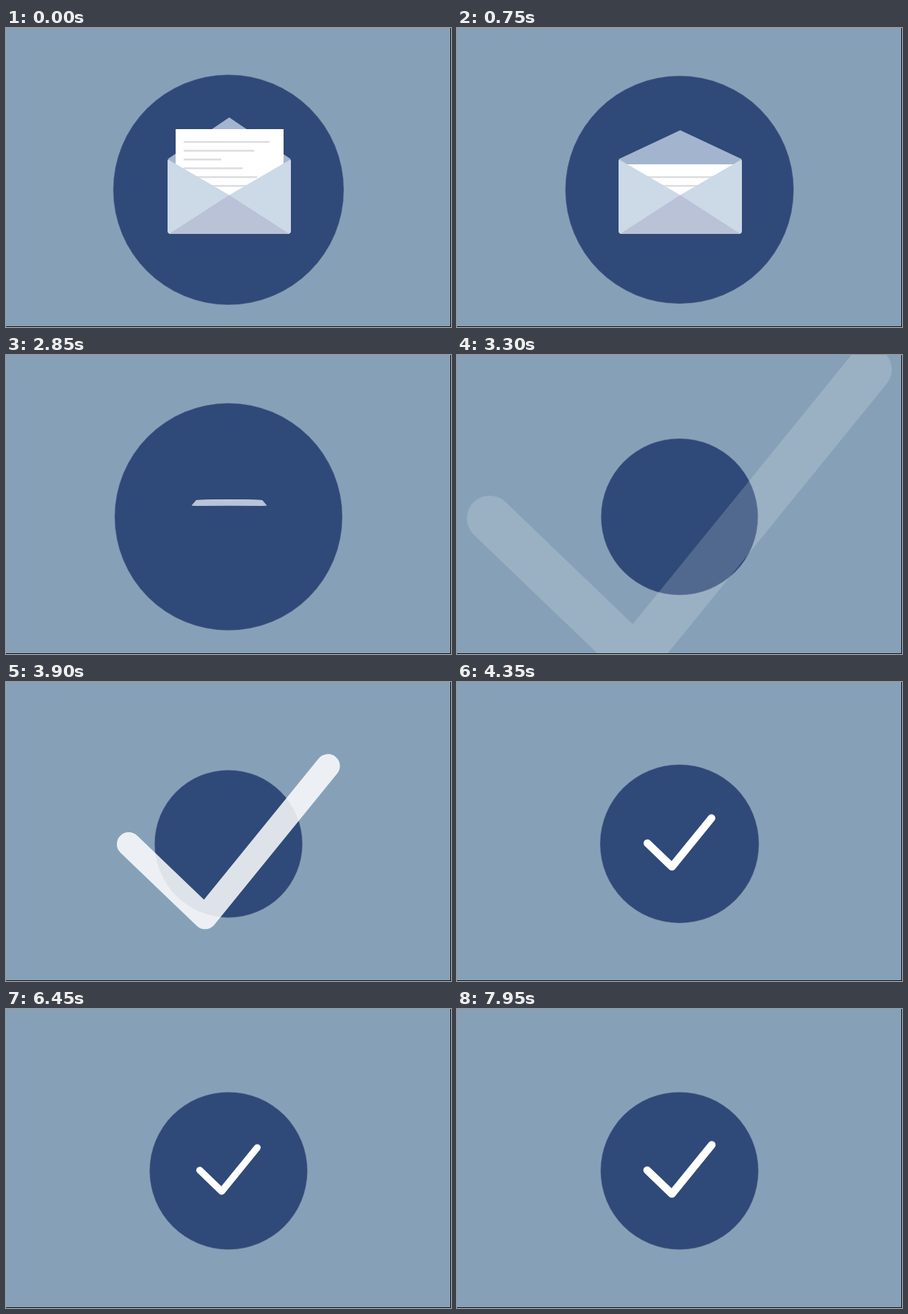
Animation of 606 by 408 pixels, one loop 8000 ms. Source, as an HTML page with a canvas:

```html
<!DOCTYPE html>
<html lang="en">
<head>
<meta charset="utf-8">
<title>Message sent</title>
<style>
  html, body { margin: 0; width: 100%; height: 100%; overflow: hidden; background: #86a1b7; }
  canvas { display: block; width: 606px; height: 408px; }
</style>
</head>
<body>
<canvas id="stage"></canvas>
<script>
const W = 606, H = 408, LOOP = 8000, STEP = 150;
const CX = 304;
const COLLAPSE = 3000, LAND = 4200;
const canvas = document.getElementById('stage');
const ctx = canvas.getContext('2d');
const dpr = window.devicePixelRatio || 1;
canvas.width = W * dpr;
canvas.height = H * dpr;
ctx.scale(dpr, dpr);

const linear = (t, from, to) => Math.min(1, Math.max(0, (t - from) / (to - from)));
const ease = (t, from, to) => {
  const u = linear(t, from, to);
  return u * u * (3 - 2 * u);
};

function polygon(color, ...points) {
  ctx.beginPath();
  points.forEach(([x, y]) => ctx.lineTo(x, y));
  ctx.closePath();
  ctx.fillStyle = color;
  ctx.fill();
}

// Settles, shrinks under the falling check, then springs back when it lands
function radius(t) {
  if (t < LAND) return 155 + 2 * Math.exp(-t / 500) - 54.4 * ease(t, COLLAPSE, COLLAPSE + 380);
  const s = (t - LAND) / 1000;
  return 107.4 - 6.8 * Math.exp(-5 * s) * Math.cos(12 * s);
}

function disc(t) {
  ctx.beginPath();
  ctx.arc(303, 220.8, radius(t), 0, Math.PI * 2);
  ctx.fillStyle = '#2f4a78';
  ctx.fill();
  ctx.strokeStyle = 'rgba(120, 120, 160, .5)';
  ctx.lineWidth = 0.8;
  ctx.stroke();
}

// Drops and sags, bounces up, then tips away into a thin strip
function pose(t) {
  const drop = ease(t, 1200, 1650), rise = ease(t, 1650, 1950), shrink = ease(t, 1950, 3030);
  const squash = drop - rise;
  return {
    top: 178 + 20 * drop - 14 * rise + 15 * shrink,
    height: 103 * (1 - shrink) - 5 * squash,
    halfTop: 84 - 42 * shrink,
    halfBase: 84 - 35.6 * shrink - 1.5 * squash,
    bow: 8 * drop - 12 * rise + 3.5 * shrink,
    tint: shrink
  };
}

function bodyPath(e) {
  const base = e.top + e.height;
  const a = CX - e.halfTop, b = CX + e.halfTop, c = CX + e.halfBase, d = CX - e.halfBase;
  const r = e.height / 23;
  const path = new Path2D();
  path.moveTo(a + r, e.top);
  path.quadraticCurveTo(CX, e.top + 2 * e.bow, b - r, e.top);
  path.quadraticCurveTo(b, e.top, b, e.top + r);
  path.lineTo(c, base - r);
  path.quadraticCurveTo(c, base, c - r, base);
  path.quadraticCurveTo(CX, base + e.bow, d + r, base);
  path.quadraticCurveTo(d, base, d, base - r);
  path.lineTo(a, e.top + r);
  path.quadraticCurveTo(a, e.top, a + r, e.top);
  return path;
}

function letter(top, base) {
  ctx.fillStyle = '#fff';
  ctx.fillRect(231, top, 147, base - 3 - top);
  ctx.fillStyle = '#d9dadd';
  [117, 96, 51, 80, 100, 100].forEach((width, i) => {
    const y = top + 16.3 + 12 * i;
    if (y < base - 5) ctx.fillRect(242, y, width, 2.3);
  });
}

function envelope(t) {
  if (t >= COLLAPSE) return;
  const e = pose(t);
  const fold = 2 * ease(t, 600, 1200) - 1;
  const k = e.height / 103;
  const base = e.top + e.height;
  const mid = e.top + e.bow;
  const reach = Math.abs(e.bow) * 2 + 2;
  const low = base + reach, high = e.top - reach;
  const tip = [CX, mid + fold * (fold < 0 ? 56 : 63) * k];
  const seam = [CX, mid + 50 * k];
  const left = [CX - e.halfTop, e.top + 1], right = [CX + e.halfTop, e.top + 1];
  const body = bodyPath(e);

  ctx.fillStyle = '#a3b5ce';
  ctx.fill(body);
  if (fold < 0) polygon('#a3b5ce', left, tip, right);
  if (fold < 1) letter(138 + 48 * ease(t, 0, 750), base);

  ctx.save();
  ctx.clip(body);
  polygon('#ccd9e6', left, seam, right, [right[0] + 2, low], [left[0] - 2, low]);
  polygon('#b9c2d7', [CX - e.halfBase + 2, base], seam, [CX + e.halfBase - 2, base],
    [CX + e.halfBase, low], [CX - e.halfBase, low]);
  if (fold > 0) {
    const flap = (color, dy) => polygon(color, [left[0], high], [left[0], left[1] + dy],
      [CX, tip[1] + dy], [right[0], right[1] + dy], [right[0], high]);
    flap('#b3c5d8', 1.8 * k);
    flap('#dee6ee', -k);
  }
  ctx.restore();

  ctx.globalAlpha = e.tint;
  ctx.fillStyle = '#b8c3da';
  ctx.fill(body);
  ctx.globalAlpha = 1;
}

// Falls towards the disc at a steady rate, then keeps pulsing
function checkScale(t) {
  const fall = 3.1 + (3900 - t) / 214;
  const pulse = 0.927 - 0.077 * Math.cos((t - 5100) / 1140 * Math.PI * 2);
  return Math.max(fall, pulse);
}

function check(t) {
  const s = checkScale(t);
  ctx.save();
  ctx.translate(303, 219.4);
  ctx.scale(s, s);
  ctx.globalAlpha = linear(t, 3150, 4040);
  ctx.beginPath();
  ctx.moveTo(-43.8, 0.6);
  ctx.lineTo(-10.3, 32.8);
  ctx.lineTo(43.7, -33.8);
  ctx.lineCap = ctx.lineJoin = 'round';
  ctx.lineWidth = 10.5;
  ctx.strokeStyle = '#fff';
  ctx.stroke();
  ctx.restore();
}

function draw(now) {
  const t = Math.floor((now % LOOP) / STEP) * STEP;
  ctx.fillStyle = '#86a1b7';
  ctx.fillRect(0, 0, W, H);
  disc(t);
  envelope(t);
  check(t);
  ctx.fillStyle = '#111';
  ctx.fillRect(0, H - 1, W, 1);
  ctx.fillRect(W - 1, 0, 1, H);
}

let start;
function tick(now) {
  start ??= now;
  draw(now - start);
  requestAnimationFrame(tick);
}
draw(0);
requestAnimationFrame(tick);
</script>
</body>
</html>
```
